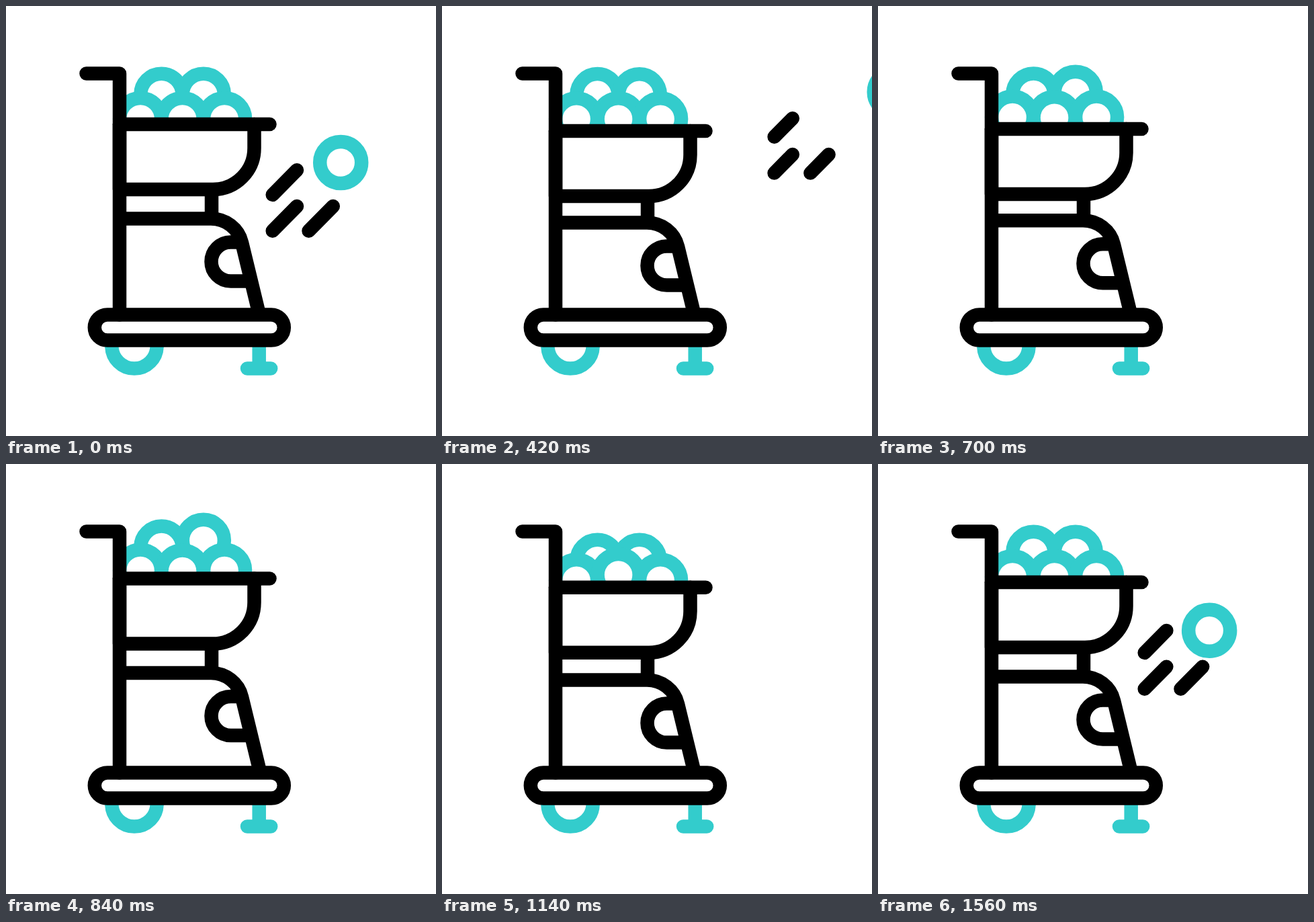
These frames come from a looping animation (640x640 px, 1.58 s). An HTML page:

```html
<!DOCTYPE html>
<html lang="en">
<head>
<meta charset="utf-8">
<title>Ball machine</title>
<style>
  html, body { margin: 0; width: 100%; height: 100%; overflow: hidden; background: #fff; }
  svg { display: block; width: 100vw; height: 100vh; }
  svg * { stroke-width: 20.5; }
  .ink { stroke: #000; fill: none; }
  .teal { stroke: #33cccc; fill: #fff; }
  .solid { fill: #fff; }
  .round { stroke-linecap: round; stroke-linejoin: round; }
</style>
</head>
<body>
<svg viewBox="0 0 640 640">
  <circle id="shot" class="teal"/>
  <g id="dashes" class="ink round"></g>
  <g id="pile"></g>

  <line id="neck" class="ink" x1="306" x2="306"/>
  <g id="shell">
    <path class="ink solid" d="M169 316.5H305C327 316.5 346 331 351 352L383 484H169"/>
    <path class="ink" d="M348 351.5H334.5a29 29 0 0 0 0 58H362"/>
  </g>
  <g id="hopper" class="round">
    <path class="ink solid" d="M369.5 176V211.5A61.5 61.5 0 0 1 308 273H169V176"/>
    <path class="ink" d="M169 176H392.5"/>
  </g>

  <circle class="teal" cx="191" cy="506" r="33.6"/>
  <path class="teal round" d="M376.7 500V539.5M359 539.5H394.2"/>
  <rect class="ink solid" x="131.8" y="459.5" width="282" height="38" rx="19"/>
  <path class="ink round" d="M119.5 100.5H169V459.5"/>
</svg>
<script>
const LOOP = 1580, STEP = 20, FIRE = 300, RADIUS = 31;
const $ = id => document.getElementById(id);

function set(el, attrs) {
  for (const key in attrs) el.setAttribute(key, attrs[key]);
}
function add(parent, tag, attrs) {
  const el = document.createElementNS("http://www.w3.org/2000/svg", tag);
  set(el, attrs);
  return parent.appendChild(el);
}
function show(el, on) {
  el.style.display = on ? "" : "none";
}
const ramp = (t, from, to) => Math.min(1, Math.max(0, (t - from) / (to - from)));

// Moves evenly from rest through the peaks, one per beat, and back to rest
function bounce(t, beats, peaks) {
  const stops = [0, ...peaks, 0];
  return beats.slice(1).reduce(
    (sum, beat, i) => sum + (stops[i + 1] - stops[i]) * ramp(t, beats[i], beat), 0);
}

const bodyBeats = [FIRE, 545, 900, 1155, 1330];
const pileBeats = [410, 580, 900, 1140, 1370, 1540];
const swing = {
  top: [6.4, -11.5, 12, -8.5],
  high: [10, -24.5, 12, -8.5],
  low: [3.8, -12.7, 5.2, -9],
  middle: [3.8, -11.3, -3, -4.2]
};

const pile = [];
function stack(y, peaksOfRow) {
  const left = 262.6 - 31.25 * (peaksOfRow.length - 1);
  peaksOfRow.forEach((peaks, i) => {
    const el = add($("pile"), "circle", { class: "teal", cx: left + 62.5 * i, r: RADIUS });
    pile.push({ y, peaks, el });
  });
}
stack(131.7, [swing.top, swing.high]);
stack(168, [swing.low, swing.middle, swing.low]);

const dashes = [0, 1, 2].map(i => ({
  x: i > 1 ? 450.5 : 396.7,
  y: i > 0 ? 334.8 : 281,
  el: add($("dashes"), "line", {})
}));

function drawShot(t) {
  const flying = t < 460;
  show($("shot"), flying || t >= 1300);
  let cx, cy, r = RADIUS;
  if (flying) {
    const n = Math.max(0, t - FIRE) / 120;
    cx = 498.2 + 175.5 * n;
    cy = 233 - 105 * n;
  } else {
    const u = (t - 1360) / 220, v = 1 - u;
    cx = v * v * 391.5 + 2 * u * v * 473 + u * u * 498.2;
    cy = v * v * 366.5 + 2 * u * v * 316 + u * u * 233;
    r = Math.min(RADIUS, 27 + (t - 1360) / 8);
  }
  set($("shot"), { cx, cy, r });
}

function drawDashes(t) {
  const leaving = t < 540, growing = t > 1380;
  show($("dashes"), leaving || growing);
  const move = leaving ? Math.max(0, t - FIRE) / 120 : 0;
  const tail = leaving ? ramp(t, FIRE, 540) ** 2 : 0;
  const head = growing ? ramp(t, 1380, LOOP) : 1;
  for (const d of dashes) {
    const x = d.x + 88.8 * move, y = d.y - 77 * move;
    set(d.el, { x1: x + 36.3 * tail, y1: y - 36.8 * tail, x2: x + 36.3 * head, y2: y - 36.8 * head });
  }
}

function draw(t) {
  const hop = bounce(t, bodyBeats, [20.6, -10.7, 9]);
  const body = bounce(t, bodyBeats, [12, -9, 6]);
  set($("hopper"), { transform: `translate(0 ${hop})` });
  set($("shell"), { transform: `translate(0 ${body})` });
  set($("neck"), { y1: 273 + hop, y2: 316.5 + body });
  for (const b of pile) set(b.el, { cy: b.y + bounce(t, pileBeats, b.peaks) });
  drawShot(t);
  drawDashes(t);
}

const start = performance.now();
function tick() {
  const t = (performance.now() - start) % LOOP;
  draw(Math.floor(t / STEP) * STEP);
  requestAnimationFrame(tick);
}
tick();
</script>
</body>
</html>
```
